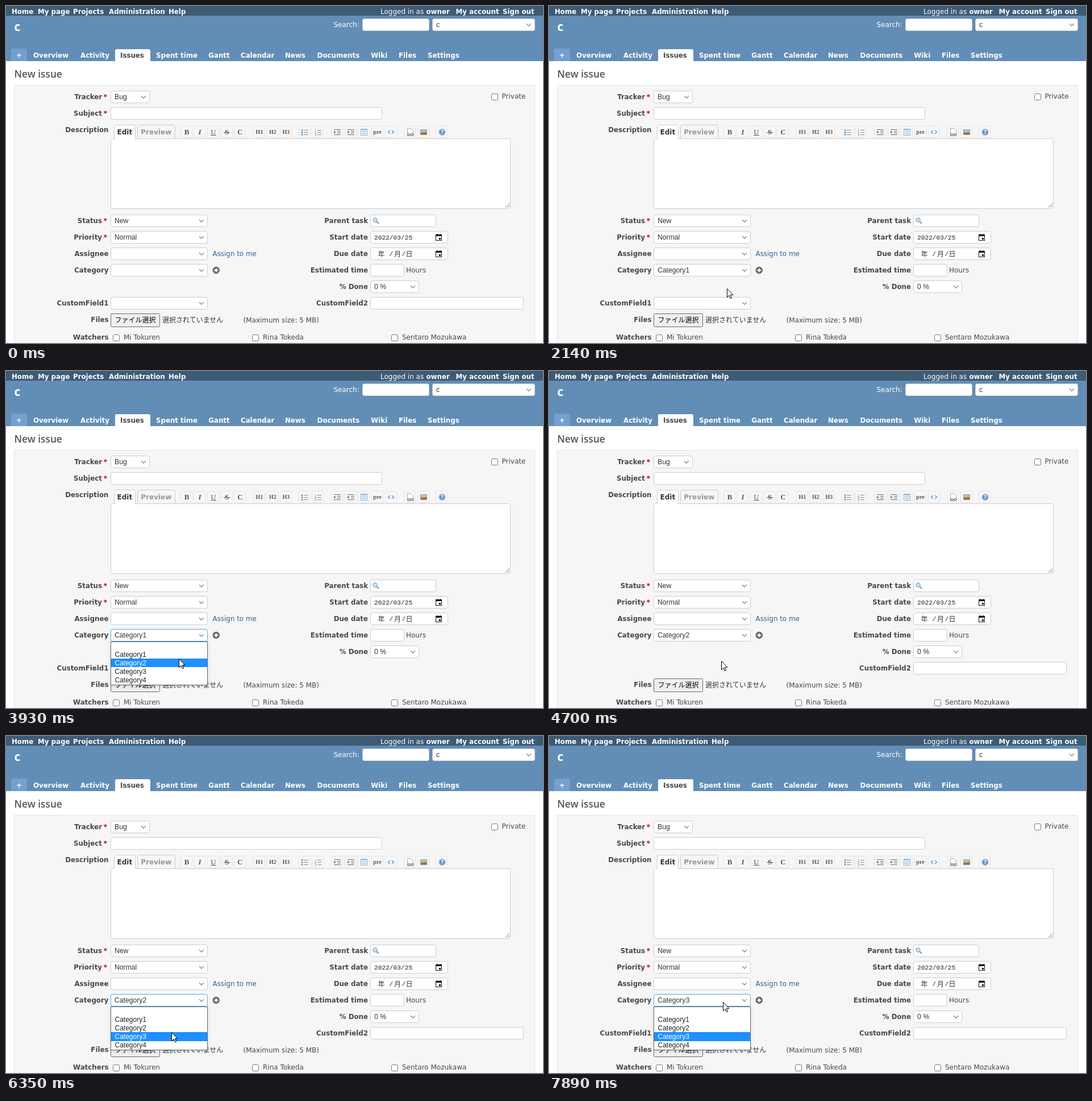
An HTML page that plays this animation: 945 px wide and 593 px high, repeating every 8000 ms.

```html
<!DOCTYPE html>
<html lang="en">
<head>
<meta charset="utf-8">
<title>New issue</title>
<style>
html, body { margin: 0; width: 100%; height: 100%; overflow: hidden; background: #fff; }
svg { display: block; width: 100vw; height: 100vh; }
text { font: 12px "DejaVu Sans", sans-serif; fill: #484848; white-space: pre; }
.b { font-weight: bold; font-size: 11.8px; }
.w { fill: #fff; }
.end { text-anchor: end; }
.mid { text-anchor: middle; }
.req { fill: #b00; }
.field { font: 12.2px "Liberation Sans", Arial, sans-serif; fill: #333; }
.option { font: 12px "Liberation Sans", Arial, sans-serif; fill: #222; }
.date { font: 11.2px "Liberation Mono", monospace; fill: #222; }
.cjk { font: 12px "Noto Sans CJK JP", "Noto Sans CJK", sans-serif; fill: #333; }
.title { font: 600 17.3px "Open Sans", sans-serif; fill: #555; }
.project { font: bold 21px "Open Sans", sans-serif; fill: #fff; }
.tool { font: bold 13px "Liberation Serif", serif; fill: #555; text-anchor: middle; }
.small { font-size: 10px; }
.line { fill: none; stroke: #888; }
</style>
</head>
<body>
<svg id="stage" viewBox="0 0 945 593"></svg>
<script>
const text = (x, y, s, cls = '', extra = '') => `<text x="${x}" y="${y}" class="${cls}" ${extra}>${s}</text>`;
const rect = (x, y, w, h, fill) => `<rect x="${x}" y="${y}" width="${w}" height="${h}" fill="${fill}"/>`;
const box = (x, y, w, h, fill = '#fff', stroke = '#ccc', r = 3, extra = '') =>
  `<rect x="${x + .5}" y="${y + .5}" width="${w - 1}" height="${h - 1}" rx="${r}" fill="${fill}" stroke="${stroke}" ${extra}/>`;
const line = (d, stroke = '#888', width = 1, extra = '') =>
  `<path d="${d}" class="line" style="stroke:${stroke};stroke-width:${width}" ${extra}/>`;
const group = (id, content, extra = '') => `<g id="${id}" ${extra}>${content}</g>`;

const input = (x, y, w) => box(x, y, w, 22);
const select = (x, y, w, value = '', id = '') =>
  box(x, y, w, 22, '#fff', '#ccc', 3, id && `id="${id}Box"`) +
  text(x + 7, y + 15.3, value, 'field', id && `id="${id}Text"`) +
  line(`M${x + w - 15} ${y + 9.2}l4 4 4-4`, '#777', 1.2);
const checkbox = (x, y, name, gap = 19) =>
  box(x, y, 12, 12, '#fff', '#767676', 2) + text(x + gap, y + 9.3, name);
const label = (x, y, s, required) => required
  ? text(x - 11.5, y, s, 'b end') + text(x - 8.7, y, '*', 'b req')
  : text(x, y, s, 'b end');
const calendar = (x, y) => box(x, y + 1, 11, 11, 'none', '#111', 0) + rect(x, y + 1, 11, 3, '#111') +
  rect(x + 2, y, 1.5, 2, '#111') + rect(x + 7.5, y, 1.5, 2, '#111') + rect(x + 6, y + 7, 3, 3, '#111');

function header() {
  const top = [[10, 'Home'], [56, 'My page'], [118, 'Projects'], [181, 'Administration'], [286, 'Help'],
    [739.5, 'owner'], [791.5, 'My account'], [874, 'Sign out']];
  const tabs = [[48, 'Overview'], [131, 'Activity'], [264, 'Spent time'], [356.3, 'Gantt'], [413, 'Calendar'],
    [491, 'News'], [547.6, 'Documents'], [642.3, 'Wiki'], [691, 'Files'], [742, 'Settings']];
  return rect(0, 0, 945, 17, '#3e5b76') + rect(0, 17, 945, 80, '#628db6') +
    top.map(([x, s]) => text(x, 13.7, s, 'b w')).join('') + text(659, 13.7, 'Logged in as', 'w') +
    text(14.5, 44, 'c', 'project') +
    text(576.5, 37, 'Search:', 'w') + input(627, 22, 118) + select(750, 22, 181, 'c') +
    '<path d="M9 97V78q0-3 3-3h22q3 0 3 3v19z" fill="#759fcf"/>' + text(23, 91, '+', 'b w mid') +
    '<path d="M192 97V79q0-3 3-3h56q3 0 3 3v18z" fill="#fff"/>' + text(201, 91, 'Issues', 'b') +
    tabs.map(([x, s]) => text(x, 91, s, 'b w')).join('');
}

function toolbar() {
  const centers = [318, 341, 365, 388.5, 412, 446, 469, 492.5, 525.5, 549, 583, 607, 630, 653.5, 677.5, 711, 735, 767];
  const buttons = centers.map(x => box(Math.round(x) - 11, 211, 21, 21, '#f7f7f7', '#e4e4e4', 2)).join('');
  const rows = (x, w, color = '#888') => [218, 222, 226].map(y => rect(x, y, w, 1, color)).join('');
  const indent = x => line(`M${x - 6} 217.5h12M${x} 220.5h6M${x} 223.5h6M${x - 6} 226.5h12`, '#666') +
    `<path d="M${x - 6} 219.5l4 2.5-4 2.5z" fill="#58a"/>`;
  const glyphs =
    text(318, 226, 'B', 'tool') +
    text(341, 226, 'I', 'tool', 'font-style="italic" style="font-style:italic"') +
    text(365, 226, 'U', 'tool', 'style="font-weight:normal"') + rect(360, 227, 10, 1, '#555') +
    text(388.5, 226, 'S', 'tool') + rect(383, 222, 11, 1, '#555') +
    text(412, 226, 'C', 'tool') +
    ['H1', 'H2', 'H3'].map((s, i) => text(446 + 23.4 * i, 225.3, s, 'tool small')).join('') +
    text(653.5, 225, 'pre', 'tool small');
  const lists = rows(524, 8) + [218.5, 222.5, 226.5].map(y => `<circle cx="521" cy="${y}" r="1.4" fill="#4b8fd0"/>`).join('') +
    rows(548, 7) + [1, 2, 3].map(n => text(544.5, 216.5 + 4 * n, n, 'mid', 'style="font-size:5px;fill:#3a78b8"')).join('');
  const table = box(624, 216, 12, 12, '#fff', '#8fb4d6', 0) + rect(625, 217, 10, 2, '#a9cbe8') +
    line('M625 221.5h10M625 224.5h10M628.5 217v10M631.5 217v10', '#a9c6e0');
  const code = line('M676 219l-3.5 3 3.5 3M679 219l3.5 3-3.5 3', '#5a9bd5', 1.5);
  const link = '<path d="M706.5 215.5h6l4 4v9h-10z" fill="#fff" stroke="#aaa"/>' +
    box(706, 224, 6, 4, '#ddd', '#666', 2) + box(712, 224, 6, 4, '#ddd', '#666', 2);
  const image = box(729, 217, 12, 10, '#9cc9ee', '#999', 0) + rect(730, 222, 10, 4, '#a86c2c') + rect(730, 221, 6, 2, '#e0a94e');
  const help = '<circle cx="767.5" cy="222" r="5.5" fill="#5b93ce" stroke="#a9c4e2" stroke-width="1.5"/>' +
    text(767.5, 225.4, '?', 'mid w', 'style="font-size:9px;font-weight:bold"');
  return buttons + glyphs + lists + indent(583) + indent(607) + table + code + link + image + help;
}

function form() {
  const left = [[164, 'Tracker', 1], [193, 'Subject', 1], [222, 'Description'], [382, 'Status', 1], [411, 'Priority', 1],
    [440, 'Assignee'], [469, 'Category'], [556, 'Files'], [587, 'Watchers']];
  const right = [[382, 'Parent task'], [411, 'Start date'], [440, 'Due date'], [469, 'Estimated time'], [498, '% Done']];
  return text(14.5, 125.5, 'New issue', 'title') + box(14, 139, 917, 470, '#f6f6f6', '#e4e4e4', 1) +
    left.map(([y, s, required]) => label(180.5, y, s, required)).join('') +
    right.map(([y, s]) => label(637, y, s)).join('') +
    select(184, 149, 69, 'Bug') + checkbox(854, 154, 'Private', 18.5) + input(184, 178, 478) +
    box(231, 209, 67, 26, '#f6f6f6') + text(237.3, 226, 'Preview', 'b', 'style="font-size:12px;fill:#999"') +
    box(184, 233, 704, 124) + line('M879 354.5l7-7M883 354.5l3-3', '#666') +
    '<path d="M190.5 234.5v-22q0-3 3-3h31q3 0 3 3v22" fill="#fff"/>' +
    line('M190.5 234v-21.5q0-3 3-3h31q3 0 3 3v21.5', '#ccc') +
    text(195.5, 226, 'Edit', 'b', 'style="font-size:12px;fill:#333"') + toolbar() +
    select(184, 367, 171, 'New') + select(184, 396, 171, 'Normal') + select(184, 425, 171) +
    text(363.5, 440, 'Assign to me', '', 'style="font-size:11.9px;fill:#2c649c"') +
    select(184, 454, 171, '', 'category') +
    '<circle cx="369.8" cy="465" r="5.5" fill="#777" stroke="#555" stroke-width="1.3"/>' +
    line('M366.5 465h6.6M369.8 461.7v6.6', '#fff', 2) +
    input(641, 367, 116) + line('M652 379l4 4', '#b98a4a', 2) +
    '<circle cx="649.5" cy="376.5" r="3.7" fill="#c4e0f8" stroke="#7fabd6" stroke-width="1.3"/>' +
    input(641, 396, 137) + text(648, 411, '2022/03/25', 'date') + calendar(756, 401) +
    input(641, 425, 137) + calendar(756, 430) +
    [[654.5, '年'], [683, '月'], [703.5, '日']].map(([x, s]) => text(x, 440.5, s, 'cjk')).join('') +
    text(674.5, 440, '/', 'date') + text(696.5, 440, '/', 'date') +
    input(641, 454, 60) + text(704, 469, 'Hours') + select(641, 483, 86, '0 %') +
    group('field1', label(180.5, 527, 'CustomField1') + select(184, 512, 171)) +
    group('field2', label(637, 527, 'CustomField2') + input(641, 512, 270)) +
    box(184, 541, 87, 24, '#efefef', '#6a6a6a', 2) + text(191.5, 557.3, 'ファイル選択', 'cjk', 'style="fill:#000"') +
    text(275, 557.3, '選択されていません', 'cjk') + text(417.5, 556.5, '(Maximum size: 5 MB)') +
    checkbox(188, 578, 'Mi Tokuren') + checkbox(433, 578, 'Rina Tokeda') + checkbox(678, 578, 'Sentaro Mozukawa');
}

const options = ['', 'Category1', 'Category2', 'Category3', 'Category4'];
const rowTops = [477, 492, 506, 521, 537, 552];

const dropdown = () => group('menu',
  box(184, 476, 171, 77, '#fff', '#666', 0, 'style="filter:drop-shadow(0 1px 3px rgba(0,0,0,.15))"') +
  '<rect id="highlight" x="185" width="169" fill="#1e90ff"/>' +
  options.map((s, i) => text(191.5, 488.3 + 14.9 * i, s, 'option')).join(''));

const $ = id => document.getElementById(id);
$('stage').innerHTML = header() + form() + dropdown() +
  group('cursor', '<path d="M.5.5v15.2l3.5-3.3 2.5 5.3 2.2-1-2.5-5.2h4.6z" fill="#fff" stroke="#000"/>');
const optionTexts = [...document.querySelectorAll('.option')];

// Screen updates happen on a fixed beat; everything below is counted in beats.
const LOOP = 8000, START = 200, BEAT = 77.58;
const path = [[0, 683, 578], [4, 324, 467], [9, 324, 467], [16, 311, 494], [24, 311, 494], [25, 313, 497],
  [28, 500, 549], [30, 702, 535], [31, 702, 535], [39, 320, 469], [41, 320, 469], [48, 304, 506], [57, 304, 506],
  [58, 303, 510], [62, 289, 525], [68, 315, 469], [73, 315, 469], [79, 291, 521], [92, 291, 521], [97, 306, 468]];
const opened = [7, 40, 70, 99], chosen = [20, 54, 86];

function cursorAt(beat) {
  const next = path.findIndex(p => p[0] > beat);
  if (next < 0) return path.at(-1).slice(1);
  if (next === 0) return path[0].slice(1);
  const [b0, x0, y0] = path[next - 1], [b1, x1, y1] = path[next];
  const u = (beat - b0) / (b1 - b0), e = u * u * (3 - 2 * u);
  return [Math.round(x0 + (x1 - x0) * e), Math.round(y0 + (y1 - y0) * e)];
}

const show = (id, visible) => $(id).style.display = visible ? '' : 'none';

function draw() {
  const beat = Math.floor((performance.now() % LOOP - START) / BEAT);
  const value = chosen.filter(b => beat >= b).length;
  const loaded = chosen.filter(b => beat > b).length;
  const open = beat >= opened[value];
  const [x, y] = cursorAt(beat);
  const row = y < rowTops[0] ? value : Math.max(0, rowTops.findLastIndex(top => y >= top));

  show('cursor', beat >= 0);
  $('cursor').setAttribute('transform', `translate(${x} ${y})`);
  show('menu', open);
  $('highlight').setAttribute('y', rowTops[row] || 0);
  $('highlight').setAttribute('height', rowTops[row + 1] - rowTops[row] || 0);
  optionTexts.forEach((el, i) => el.style.fill = i === row ? '#fff' : '');
  $('categoryText').textContent = options[value];
  $('categoryBox').setAttribute('stroke', open || value > loaded ? '#5ad' : '#ccc');
  show('field1', loaded !== 2);
  show('field2', loaded !== 1);
  requestAnimationFrame(draw);
}
draw();
</script>
</body>
</html>
```
